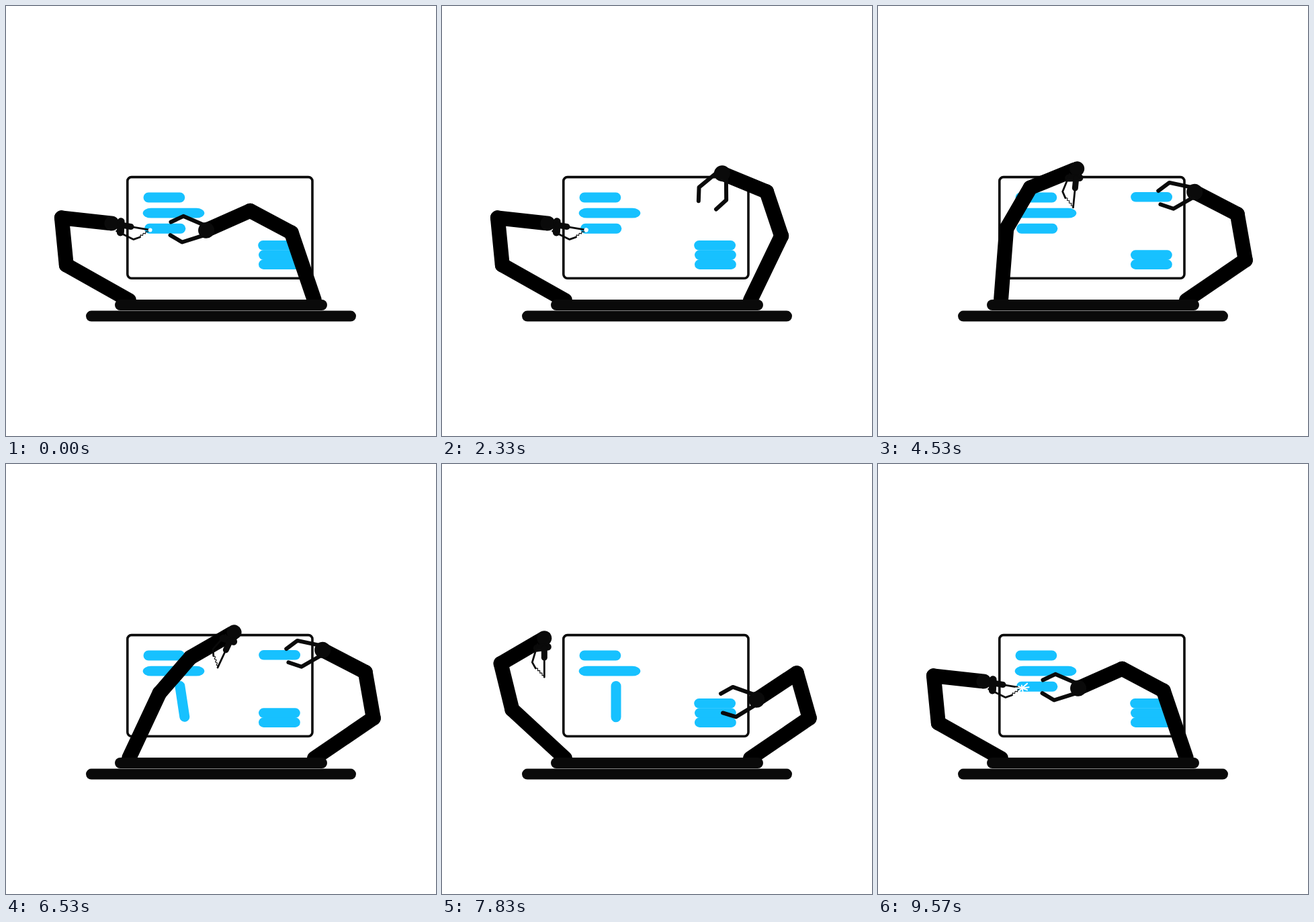
These frames come from a looping animation (640x640 px, 9.61 s). An HTML page:

```html
<!DOCTYPE html>
<html lang="en">
<head>
<meta charset="utf-8">
<title>Robot arms at a laptop</title>
<style>
html, body { margin: 0; width: 100%; height: 100%; overflow: hidden; background: #fff; }
svg { display: block; width: 100vw; height: 100vh; }

.ink { fill: #0a0a0a; }
.line { fill: none; stroke: #0a0a0a; stroke-linecap: round; stroke-linejoin: round; }
.bone { stroke: #000; stroke-width: 22; stroke-linecap: round; }
.blue { fill: #17c1ff; }

.move { animation: 9610ms ease-in-out infinite; }

/* Left arm: each joint turns relative to its parent */
.l1 { translate: 183px 438px; animation-name: l1; }
.l2 { translate: 107px 0; animation-name: l2; }
.l3 { translate: 70.5px 0; animation-name: l3; }
.l4 { translate: 75px 0; animation-name: l4; }
@keyframes l1 {
  0%, 35.38%, 97.29%, 100% { rotate: -150.6deg; }
  52.03%, 62.12% { rotate: -71.4deg; }
  67.95% { rotate: -64.9deg; }
  72.11% { rotate: -88deg; }
  81.48%, 82.73% { rotate: -137.3deg; }
  90.53% { rotate: -155deg; }
}
@keyframes l2 {
  0%, 35.38%, 97.29%, 100% { rotate: 55deg; }
  52.03% { rotate: 19.4deg; }
  57.96%, 62.12% { rotate: 28.4deg; }
  67.95% { rotate: 15.9deg; }
  72.11% { rotate: 13deg; }
  81.48%, 82.73% { rotate: 33.5deg; }
  90.53% { rotate: 50deg; }
}
@keyframes l3 {
  0%, 35.38%, 97.29%, 100% { rotate: 101.9deg; }
  52.03% { rotate: 23.7deg; }
  57.96%, 62.12% { rotate: 13deg; }
  67.95% { rotate: 19deg; }
  72.11% { rotate: 50deg; }
  81.48%, 82.73% { rotate: 73.5deg; }
  90.53% { rotate: 80deg; }
}
@keyframes l4 {
  0%, 97.29%, 100% { rotate: 3.5deg; }
  34.86% { rotate: 3.5deg; animation-timing-function: ease-in; }
  38.19% { rotate: 32.6deg; animation-timing-function: linear; }
  42.66% { rotate: 100deg; animation-timing-function: ease-out; }
  47.14% { rotate: 117.8deg; }
  52.55% { rotate: 62deg; }
  57.96%, 62.12% { rotate: 157deg; }
  67.95% { rotate: 145deg; }
  72.11% { rotate: 120deg; }
  81.48%, 82.73% { rotate: 120.3deg; }
  90.53% { rotate: 85deg; }
}

/* Right arm */
.r1 { translate: 459px 438px; animation-name: r1; }
.r2 { translate: 106.3px 0; animation-name: r2; }
.r3 { translate: 69.5px 0; animation-name: r3; }
.r4 { translate: 71.5px 0; animation-name: r4; }
.jaw { animation-name: jaw; }
@keyframes r1 {
  0%, 94.69%, 100% { rotate: -108.8deg; }
  13.53% { rotate: -108.8deg; animation-timing-function: ease-in; }
  24.25% { rotate: -64.4deg; animation-timing-function: ease-out; }
  28.1% { rotate: -14deg; }
  30.7%, 82.73% { rotate: -34.3deg; }
}
@keyframes r2 {
  0%, 13.53%, 94.69%, 100% { rotate: -43.2deg; }
  24.25% { rotate: -44.3deg; }
  28.1% { rotate: -75deg; }
  30.7%, 32.05%, 79.08%, 82.73% { rotate: -71.5deg; }
  37.46%, 73.36% { rotate: -65.7deg; }
}
@keyframes r3 {
  0%, 13.53%, 94.69%, 100% { rotate: -52deg; }
  24.25% { rotate: -49.1deg; }
  28.1% { rotate: -85deg; }
  30.7%, 32.05%, 79.08%, 82.73% { rotate: -107.7deg; }
  37.46%, 73.36% { rotate: -52.7deg; }
}
@keyframes r4 {
  0%, 94.69%, 100% { rotate: 26.7deg; }
  13.53% { rotate: 26.7deg; animation-timing-function: ease-in; }
  24.25% { rotate: -87.6deg; animation-timing-function: ease-out; }
  28.1% { rotate: 5deg; }
  30.7%, 32.05%, 79.08%, 82.73% { rotate: 27.5deg; }
  37.46%, 73.36% { rotate: -36.3deg; }
}
@keyframes jaw {
  0%, 13.53%, 94.69%, 100% { rotate: 10.4deg; }
  24.25%, 30.7%, 80.96%, 82.73% { rotate: 15.5deg; }
  32.05%, 79.08% { rotate: 10.9deg; }
}

/* Blocks on the screen */
.lifted { animation-name: lift; }
.hinged { transform-origin: 259px 331.3px; animation-name: swing; }
@keyframes lift {
  0%, 32.05%, 79.08%, 100% { translate: 0 0; }
  37.46%, 73.36% { translate: 1px -72px; }
}
@keyframes swing {
  0%, 97.29%, 100% { rotate: 0deg; }
  62.12% { rotate: 0deg; animation-timing-function: ease-in; }
  65.04% { rotate: -88deg; animation-timing-function: ease-out; }
  66.91% { rotate: -102deg; }
  67.95% { rotate: -98.6deg; }
  69.93% { rotate: -84deg; }
  72.32% { rotate: -92deg; }
  74.4%, 93.13% { rotate: -90deg; }
}
</style>
</head>
<body>
<svg viewBox="0 0 640 640">
  <rect class="line" x="180.8" y="254.6" width="275.2" height="150.7" rx="6" stroke-width="3.6"/>

  <g class="blue">
    <rect x="204.5" y="277.5" width="61.8" height="15" rx="7.5"/>
    <rect x="203.7" y="300.8" width="91.6" height="14.8" rx="12" ry="7.4"/>
    <rect class="move hinged" x="206" y="323.8" width="61.3" height="15" rx="7.5"/>
    <rect x="376" y="363.3" width="61.8" height="14.6" rx="7.3"/>
    <rect x="376" y="377.3" width="61.8" height="14.7" rx="7.3"/>
    <rect class="move lifted" x="375.2" y="349" width="61.8" height="14.6" rx="7.3"/>
  </g>

  <g class="move r1">
    <path class="bone" d="M0 0H106.3"/>
    <g class="move r2">
      <path class="bone" d="M0 0H69.5"/>
      <g class="move r3">
        <path class="bone" d="M0 0H71.5"/>
        <g class="move r4">
          <g class="line" stroke-width="6">
            <path class="move jaw" d="M0 6L38 12.7L54 0"/>
            <g transform="scale(1 -1)"><path class="move jaw" d="M0 6L38 12.7L54 0"/></g>
          </g>
          <circle class="ink" r="12"/>
        </g>
      </g>
    </g>
  </g>

  <g class="move l1">
    <path class="bone" d="M0 0H107"/>
    <g class="move l2">
      <path class="bone" d="M0 0H70.5"/>
      <g class="move l3">
        <path class="bone" d="M0 0H71"/>
        <g class="move l4">
          <circle class="ink" r="11"/>
          <g class="line">
            <path d="M13 -5L15 11" stroke-width="11"/>
            <path d="M15 0H29" stroke-width="9"/>
            <path d="M28 0H58M9 10L36 18L45 13" stroke-width="2.8"/>
            <path d="M45 13v-3.2h3.5v-3.2h3.5v-3.3h3.5v-3.3h3" stroke-width="1.1"/>
          </g>
          <g id="spark" transform="translate(58 0)"></g>
        </g>
      </g>
    </g>
  </g>

  <rect class="ink" x="162" y="437" width="316" height="16" rx="8"/>
  <rect class="ink" x="119" y="453.6" width="402" height="16" rx="8"/>
</svg>
<script>
const LOOP = 9610, BURST = 763;
const SVG = "http://www.w3.org/2000/svg";
const spark = document.getElementById("spark");
const clock = document.querySelector(".l1").getAnimations()[0];

function add(name, attrs) {
  const el = document.createElementNS(SVG, name);
  for (const key in attrs) el.setAttribute(key, attrs[key]);
  return spark.appendChild(el);
}

const dot = add("circle", { fill: "#fff" });
// Angle and reach of each ray
const rays = [[-110, .4], [-52, 1], [-17, 1], [12, .8], [70, .6], [125, .6], [170, 1], [-165, .6]]
  .map(([angle, reach]) => ({
    reach,
    el: add("line", {
      transform: `rotate(${angle})`, stroke: "#fff", "stroke-width": 2, "stroke-linecap": "round"
    })
  }));

function phaseAt(t) {
  if (t < BURST * 5) return t % BURST / BURST;
  return t > 9420 ? (t - 9420) / BURST : -1;
}

function draw() {
  const p = phaseAt((clock.currentTime || 0) % LOOP);
  spark.style.display = p < 0 ? "none" : "";
  if (p >= 0) {
    const q = Math.max(0, p - .1);
    dot.setAttribute("r", q ? Math.max(0, 3.5 - q * 20) : 3 + p * 8);
    for (const { el, reach } of rays) {
      el.style.display = q ? "" : "none";
      el.setAttribute("x1", 28 * q * reach);
      el.setAttribute("x2", 38 * Math.sqrt(q) * reach);
    }
  }
  requestAnimationFrame(draw);
}
draw();
</script>
</body>
</html>
```
